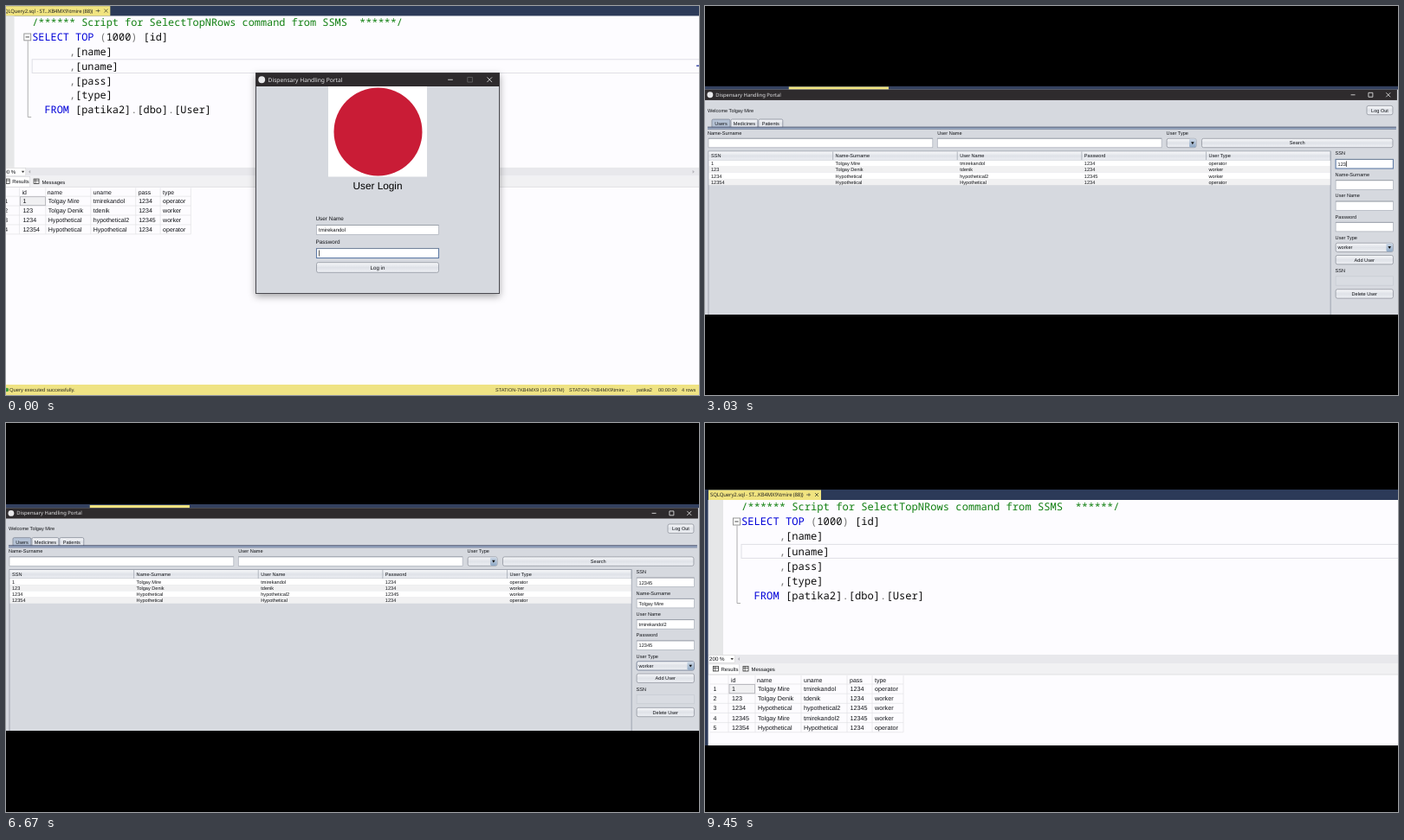
Recreate the animation shown at these times as an HTML page. Size 800 by 450 pixels, loop 9.51 s.

```html
<!DOCTYPE html>
<html lang="en">
<head>
<meta charset="utf-8">
<title>User administration</title>
<style>
html, body { margin: 0; width: 100%; height: 100%; overflow: hidden; background: #000; }
svg { display: block; width: 100vw; height: 100vh; }
text { font-family: "Liberation Sans", Arial, sans-serif; white-space: pre; text-rendering: geometricPrecision; }
text.code { font-family: "Noto Sans Mono", "DejaVu Sans Mono", monospace; font-weight: 500; }
text.ui { font-family: "Noto Sans", "Open Sans", sans-serif; }
</style>
</head>
<body>
<svg id="stage" viewBox="0 0 800 450">
  <defs>
    <linearGradient id="button" x2="0" y2="1">
      <stop offset="0" stop-color="#f7f8fa"/><stop offset=".5" stop-color="#dfe2e8"/><stop offset="1" stop-color="#eef0f4"/>
    </linearGradient>
    <linearGradient id="arrow" x2="0" y2="1">
      <stop offset="0" stop-color="#cdd8e6"/><stop offset="1" stop-color="#8fa9c6"/>
    </linearGradient>
    <filter id="shadow" x="-10%" y="-10%" width="120%" height="125%">
      <feDropShadow dx="0" dy="3" stdDeviation="4" flood-opacity=".35"/>
    </filter>
  </defs>
</svg>
<script>
const LOOP = 9510;
const LOGIN_AT = 1200, QUERY_AT = 7760, RERUN_AT = 8900, ADD_AT = 7080;
const APP_TITLE = "Dispensary Handling Portal";
const USER = "Tolgay Mire", LOGIN = "tmirekandol";
const HOST = "STATION-7KB4MX9";
const NAVY = "#2c3a58", YELLOW = "#f1e480", PANEL = "#d6d9df", PAPER = "#fdfcff", INK = "#111317";

const USERS = [
  ["1", USER, LOGIN, "1234", "operator"],
  ["123", "Tolgay Denik", "tdenik", "1234", "worker"],
  ["1234", "Hypothetical", "hypothetical2", "12345", "worker"],
  ["12345", USER, LOGIN + "2", "12345", "worker"],
  ["12354", "Hypothetical", "Hypothetical", "1234", "operator"]
];
const OLD_USERS = USERS.filter(u => u[0] !== "12345");

const rect = (x, y, w, h, fill, extra = "") =>
  `<rect x="${x}" y="${y}" width="${w}" height="${h}" fill="${fill}" ${extra}/>`;
const path = (d, stroke, width = 1, extra = "") =>
  `<path d="${d}" fill="none" stroke="${stroke}" stroke-width="${width}" ${extra}/>`;
// Text is placed by its vertical middle.
const text = (x, y, s, size, fill = INK, extra = "") =>
  `<text x="${x}" y="${y + size * .36}" font-size="${size}" fill="${fill}" ${extra}>${s}</text>`;
const middle = 'text-anchor="middle"';
const group = (id, body) => `<g id="${id}">${body}</g>`;

const button = (x, y, w, h, label, size) =>
  rect(x, y, w, h, "url(#button)", 'rx="2" stroke="#868b95" stroke-width=".7"') +
  text(x + w / 2, y + h / 2, label, size, INK, middle);

const field = (x, y, w, h, id = "", size = 5.6) =>
  rect(x, y, w, h, "#fff", `stroke="#a9aeb8" stroke-width=".7" ${id && `id="${id}Box"`}`) +
  path(`M${x} ${y}h${w}`, "#858b96", .6) +
  (id && text(x + 2.5, y + h / 2 + .3, "", size, INK, `id="${id}"`) +
    path(`M${x + 3} ${y + 2}v${h - 4}`, "#111", .7, `id="${id}Caret"`));

const combo = (x, y, w, h, label, id = "") =>
  rect(x, y, w, h, "url(#button)", `rx="2" stroke="#868b95" stroke-width=".7" ${id && `id="${id}"`}`) +
  rect(x + w - 8, y + .3, 7.7, h - .6, "url(#arrow)", 'rx="1.5"') +
  `<path d="M${x + w - 6} ${y + h / 2 - 1.3}h3.6l-1.8 3z" fill="#111"/>` +
  text(x + 2.5, y + h / 2, label, 5.6);

const titleBar = (x, y, w, h, size, gap, maxColor) => {
  const cy = y + h / 2, r = size * .42, right = x + w - gap / 2;
  const [a, b, c] = [right - 2 * gap, right - gap, right];
  return rect(x, y, w, h, "#2e2b2d") +
    `<circle cx="${x + size}" cy="${cy}" r="${size * .58}" fill="#e8e8ea"/>` +
    text(x + size * 2.1, cy, APP_TITLE, size, "#e4e4e6", 'class="ui"') +
    path(`M${a - r} ${cy}h${2 * r}`, "#eee", .8) +
    path(`M${b - r} ${cy - r}h${2 * r}v${2 * r}h${-2 * r}z`, maxColor, .8) +
    path(`M${c - r} ${cy - r}l${2 * r} ${2 * r}m0 ${-2 * r}l${-2 * r} ${2 * r}`, "#eee", .8);
};

function resultGrid(users) {
  const cols = [27, 58, 111, 164, 193, 229], xs = [31, 61, 114, 167.5, 196];
  const top = 302, step = 11.15, bottom = top + users.length * step;
  let out = "";
  for (let i = 0; i <= users.length; i++) out += path(`M6 ${top + i * step}H229`, "#e2e2e5", .7);
  cols.forEach(x => out += path(`M${x} 292V${bottom}`, "#e2e2e5", .7));
  out += rect(28, 302.6, 29.5, 10.2, "#f0f0f2", 'stroke="#a2a2a8" stroke-width=".7"');
  users.forEach((user, i) => {
    const y = top + (i + .5) * step;
    out += text(9.5, y, i + 1, 7) + user.map((s, c) => text(xs[c], y, s, 7.2)).join("");
  });
  return out;
}

function sqlEditor() {
  const kw = s => `<tspan fill="#0000d8">${s}</tspan>`, op = s => `<tspan fill="#777">${s}</tspan>`;
  const column = s => `      ${op(",")}[${s}]`;
  const lines = [
    '<tspan fill="#128012">/****** Script for SelectTopNRows command from SSMS  ******/</tspan>',
    `${kw("SELECT")} ${kw("TOP")} ${op("(")}1000${op(")")} [id]`,
    column("name"), column("uname"), column("pass"), column("type"),
    `  ${kw("FROM")} [patika2]${op(".")}[dbo]${op(".")}[User]`
  ];
  const icon = x => rect(x, 281.5, 6, 5.5, "#fff", 'stroke="#333" stroke-width=".8"') +
    path(`M${x} 283.5h6M${x + 2.2} 281.5v5.5`, "#333", .7);
  return rect(0, 76, 840, 470, PAPER) + rect(0, 76, 840, 13, NAVY) +
    rect(4, 77.5, 130, 11.5, YELLOW) +
    text(6, 83, `SQLQuery2.sql - ST...KB4MX9\\tmire (88))`, 6, "#222", 'class="ui" letter-spacing="-.12"') +
    path("M117 83h5m-2-1.8v3.6", "#554", .8) + path("M127 81l4 4m0-4l-4 4", "#443", .8) +
    rect(4, 89, 17, 179, "#e6e7e8") +
    rect(42, 140.4, 810, 16, "none", 'stroke="#dfdfe5"') +
    path("M37 118.5V208.5H41", "#a5a5a5", .9) +
    rect(32.5, 110, 8, 8, "#fff", 'stroke="#8a8a8a" stroke-width=".9"') + path("M34.3 114h4.4", "#333", .9) +
    lines.map((s, i) => text(42, 96.6 + i * 17.2, s, 12.13, "#0c0c0c", 'class="code"')).join("") +
    path("M145 141.5v14.5", "#000", 1, 'id="sqlCaret"') +
    rect(4, 268, 836, 10, "#e8e8ec") + rect(4, 268.5, 30.5, 9, "#fff", 'stroke="#ccc" stroke-width=".5"') +
    text(5, 272.7, "200 %", 6.2) + `<path d="M29.5 272h3.4l-1.7 2.2z" fill="#333"/>` +
    `<path d="M40 271v4l-2.2-2z" fill="#b5b5ba"/><path d="M820 271v4l2.2-2z" fill="#b5b5ba"/>` +
    rect(4, 278, 836, 13, "#f1f1f3") + rect(4, 279, 35.5, 12, "#fff", 'stroke="#d5d5d8" stroke-width=".6"') +
    icon(9.5) + icon(44) + text(18.5, 284.6, "Results", 6) + text(53.5, 285.2, "Messages", 6) +
    path("M4 291H840", "#dadade", .8) +
    ["id", "name", "uname", "pass", "type"].map((s, i) => text([30, 60, 114, 167, 196][i], 297, s, 7)).join("") +
    group("gridOld", resultGrid(OLD_USERS)) + group("gridNew", resultGrid(USERS)) +
    rect(0, 76, 3.6, 470, NAVY);
}

function loginDialog() {
  const status = [[4, "Query executed successfully."], [565, `${HOST} (16.0 RTM)`],
    [650, `${HOST}\\tmire ...`], [728, "patika2"], [753, "00:00:00"], [780, "4 rows"]];
  return rect(797, 68.5, 3, 1.3, "#2233a0") +
    rect(0, 438, 800, 12, "#efe384") + '<circle cx="1" cy="444" r="2.2" fill="#3c9a3c"/>' +
    status.map(([x, s], i) => text(x, 444, s, i ? 5.55 : 5.85, "#2a2a20")).join("") +
    rect(288.5, 77.5, 281, 255, PANEL, 'stroke="#4a4a50" filter="url(#shadow)"') +
    titleBar(288.5, 77.5, 281, 15.5, 6.7, 22.6, "#666") +
    rect(372, 93, 114, 104.5, "#fff") + '<circle cx="429.5" cy="145.5" r="51" fill="#c91c36"/>' +
    text(429, 208.1, "User Login", 11.8, "#000", middle) +
    text(357.5, 246, "User Name", 6.4) + field(358.5, 253.5, 141, 11, "loginName", 6) +
    text(357.5, 273, "Password", 6.4) + field(358.5, 280.5, 141, 11, "loginPass", 6.5) +
    button(358.5, 296.7, 141, 11.6, "Log in", 6.2);
}

function appTable(users) {
  return users.map((user, i) => {
    const y = 178 + i * 7.2;
    return rect(4.5, y, 719, 7.2, i % 2 ? "#f1f1f2" : "#fff") +
      user.map((s, c) => text(7 + c * 144, y + 3.8, s, 5.6)).join("");
  }).join("");
}

function appWindow() {
  const tabs = [["Users", 8, 21], ["Medicines", 30, 31], ["Patients", 62, 28]];
  const heads = ["SSN", "Name-Surname", "User Name", "Password", "User Type"];
  const labels = [[3, 146, "Name-Surname"], [269, 146, "User Name"], [534, 146, "User Type"],
    ...heads.map((s, i) => [729.5, 170 + i * 24.5, s]), [729.5, 306, "SSN"]];
  return rect(0, 88, 810, 9, "#34415f") + rect(97, 92.8, 115.5, 3.2, YELLOW) +
    rect(0, 96, 810, 280, PANEL) + titleBar(0, 96, 801, 12.3, 5.9, 20.4, "#eee") +
    text(3, 120.3, "Welcome " + USER, 5.6) + button(766, 114.8, 30, 10.4, "Log Out", 5.6) +
    rect(766, 114.8, 30, 10.4, "none", 'id="logoutFocus" rx="2" stroke="#657fa8" stroke-width="1"') +
    tabs.map(([s, x, w], i) => rect(x, 130.5, w, 10, i ? "url(#button)" : "#b5c2d5",
      'rx="1.5" stroke="#777e8c" stroke-width=".7"') + text(x + w / 2, 135.5, s, 5.6, INK, middle)).join("") +
    rect(3, 139.7, 797, 2.2, "#98a9c3") + path("M3 139.6H800", "#353e5c", .8) + path("M3 142H800", "#6a7590", .6) +
    labels.map(([x, y, s]) => text(x, y, s, 5.6)).join("") +
    field(4, 152.7, 259.5, 10.6) + field(269, 152.7, 259.5, 10.6) +
    combo(534.5, 152.8, 34, 10.4, "") + button(575, 152.8, 221, 10.4, "Search", 5.6) +
    rect(4, 167.5, 720, 200, PANEL, 'stroke="#9298a4" stroke-width=".8"') +
    rect(4.4, 168, 719, 10, "url(#button)") + path("M4 178H724", "#a0a5af", .7) +
    heads.map((s, i) => path(`M${148 + i * 144} 168v10`, "#9ea3ad", .7) + text(7 + i * 144, 173, s, 5.6)).join("") +
    group("tableOld", appTable(OLD_USERS)) + group("tableNew", appTable(USERS)) +
    ["ssn", "name", "uname", "pass"].map((id, i) => field(730, 177 + i * 24.35, 66.5, 10.6, id)).join("") +
    combo(730, 274, 66.5, 10.3, "worker", "role") +
    button(730, 288.3, 66.5, 10.4, "Add User", 5.6) +
    rect(730, 312.7, 66.5, 10.4, "#d9dce2", 'stroke="#c6cad2" stroke-width=".7"') +
    button(730, 327.7, 66.5, 10.4, "Delete User", 5.6);
}

const stage = document.getElementById("stage");
stage.insertAdjacentHTML("beforeend",
  group("sql", sqlEditor()) + group("login", loginDialog()) + group("app", appWindow()) +
  rect(0, 0, 800, 0, "#000", 'id="maskTop"') + rect(0, 0, 800, 450, "#000", 'id="maskBottom"'));

const el = id => document.getElementById(id);
const show = (id, on) => el(id).setAttribute("display", on ? "inline" : "none");
const typed = (s, t, from, to) =>
  s.slice(0, Math.max(0, Math.min(s.length, Math.floor((t - from) / (to - from) * s.length))));

function setField(id, value, focused, caret = focused) {
  const label = el(id), box = el(id + "Box");
  if (label.textContent !== value) label.textContent = value;
  box.setAttribute("stroke", focused ? "#607ca6" : "#a9aeb8");
  box.setAttribute("stroke-width", focused ? 1.1 : .7);
  show(id + "Caret", caret);
  if (caret) el(id + "Caret").setAttribute("transform", `translate(${value ? label.getComputedTextLength() : 0} 0)`);
}

function setMask(top, bottom) {
  el("maskTop").setAttribute("height", top);
  el("maskBottom").setAttribute("y", bottom);
}

function drawLogin(t) {
  el("sql").setAttribute("transform", "translate(-11 -75.8) scale(.98)");
  setField("loginName", LOGIN, false);
  setField("loginPass", typed("••••", t, 500, 960), true);
  setMask(0, 450);
}

// Each entry: id, value, typing start, typing end, focus start, focus end.
const ENTRIES = [
  ["ssn", "12345", 2600, 3150, 2450, 3250],
  ["name", USER, 3280, 4280, 3250, 4400],
  ["uname", LOGIN + "2", 4450, 5450, 4400, 5520],
  ["pass", "12345", 5700, 6300, 5520, 6450]
];

function drawApp(t) {
  const added = t >= ADD_AT;
  const [scale, dy, top, bottom] = t < 2900 ? [1, 0, 92, 358] : t < 6000 ? [.9974, .9, 92.8, 357] : [.9974, 2.5, 94, 356];
  el("app").setAttribute("transform", `translate(0 ${dy}) scale(${scale})`);
  setMask(top, bottom);
  for (const [id, value, from, to, focus, blur] of ENTRIES) {
    const focused = t >= focus && t < blur;
    setField(id, added ? "" : typed(value, t, from, to), focused, focused && t >= from);
  }
  show("logoutFocus", t < 2450);
  el("role").setAttribute("stroke", t >= 6450 && !added ? "#55637c" : "#868b95");
  show("tableOld", !added);
  show("tableNew", added);
}

function drawQuery() {
  el("sql").removeAttribute("transform");
  setMask(77, 373);
}

function render(t) {
  const inLogin = t < LOGIN_AT, inQuery = t >= QUERY_AT;
  show("login", inLogin);
  show("sql", inLogin || inQuery);
  show("app", !inLogin && !inQuery);
  show("gridOld", t < RERUN_AT);
  show("gridNew", t >= RERUN_AT);
  show("sqlCaret", inQuery && (t - QUERY_AT) % 1060 < 530);
  if (inLogin) drawLogin(t);
  else if (inQuery) drawQuery();
  else drawApp(t);
}

function tick() {
  render(performance.now() % LOOP);
  requestAnimationFrame(tick);
}
tick();
</script>
</body>
</html>
```
